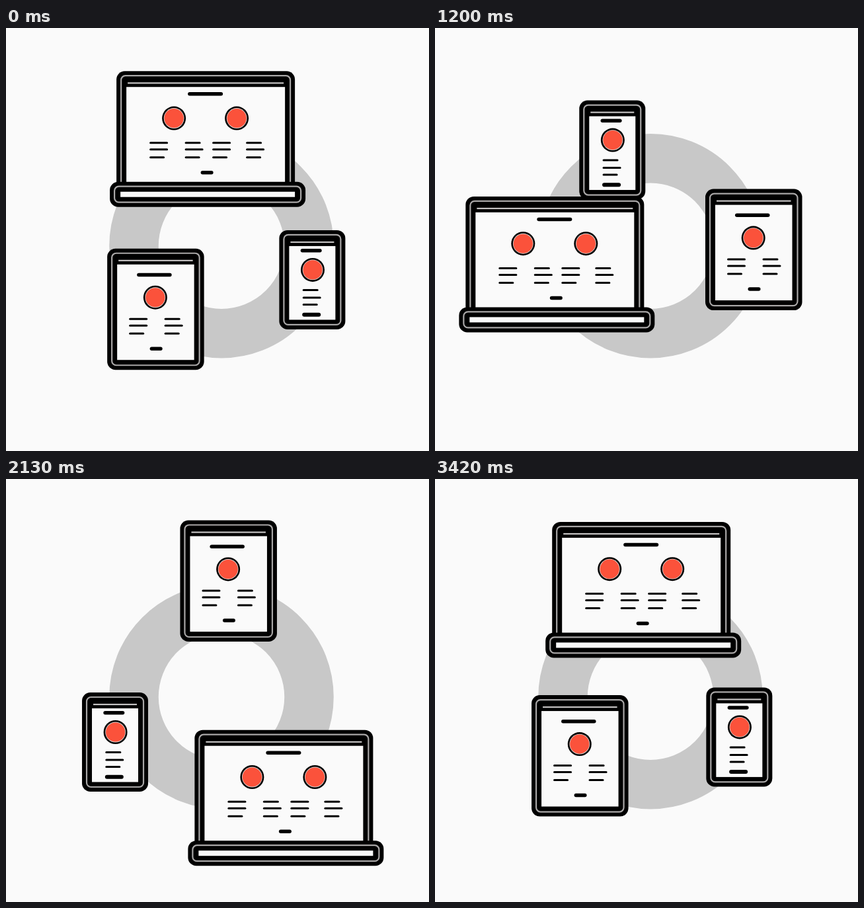
An HTML page that plays this animation: 640 px wide and 640 px high, repeating every 3450 ms.

```html
<!DOCTYPE html>
<html lang="en">
<head>
<meta charset="utf-8">
<title>Orbiting devices</title>
<style>
  html, body { margin: 0; width: 100%; height: 100%; overflow: hidden; background: #fafafa; }
  svg { display: block; width: 100vw; height: 100vh; }
</style>
</head>
<body>
<svg id="stage" viewBox="0 0 640 640">
  <circle cx="326" cy="329.7" r="132.5" fill="none" stroke="#c8c8c8" stroke-width="74.5"/>
</svg>
<script>
const LOOP = 3450, STEP = 30, RAD = Math.PI / 180;
const INK = '#000', EDGE = '#a9a7a7', PAPER = '#fafafa', RED = '#fb523b';
const stage = document.getElementById('stage');

function add(parent, tag, attrs) {
  const el = document.createElementNS('http://www.w3.org/2000/svg', tag);
  for (const key in attrs) el.setAttribute(key, attrs[key]);
  parent.appendChild(el);
  return el;
}

const box = (g, x, y, width, height, rx, fill) =>
  add(g, 'rect', { x, y, width, height, rx, fill });

function bar(g, x1, x2, y, w) {
  box(g, x1, y - w / 2, x2 - x1, w, w / 2, INK);
}

function dot(g, cx, cy) {
  [[18, INK], [15.4, '#d8d4d2'], [14.6, RED]].forEach(([r, fill]) =>
    add(g, 'circle', { cx, cy, r, fill }));
}

function text(g, x, ys, ends) {
  ys.forEach((y, i) => bar(g, x, x + ends[i], y, 3));
}

// Black case with a thin light outline inside its edge
function shell(g, x, y, w, h) {
  box(g, x, y, w, h, 12.5, INK);
  add(g, 'rect', {
    x: x + 7, y: y + 7, width: w - 14, height: h - 14, rx: 6.5,
    fill: 'none', stroke: EDGE, 'stroke-width': 2.2
  });
}

function screen(g, x, y, w, bottom) {
  box(g, x + 17, y + 17, w - 34, 2.2, 0, '#c4c2c2');
  box(g, x + 15, y + 24, w - 30, bottom - y - 24, 0, PAPER);
}

function laptop() {
  const g = add(stage, 'g', {}), ys = [174.5, 184.5, 196.5];
  shell(g, 167, 66, 270, 190);
  screen(g, 167, 66, 270, 236);
  shell(g, 157, 233.5, 296, 38);
  box(g, 173, 248.5, 264, 8, 0, PAPER);
  bar(g, 275, 328, 100.5, 5.5);
  dot(g, 254, 137.3);
  dot(g, 349, 137.3);
  text(g, 217, ys, [28, 28, 23]);
  text(g, 270.5, ys, [24, 28, 23]);
  text(g, 312, ys, [28, 28, 23]);
  text(g, 363, ys, [24, 28, 23]);
  bar(g, 294.5, 313.5, 219.5, 5.5);
  return g;
}

function tablet() {
  const g = add(stage, 'g', {}), ys = [440.5, 450.5, 462.5];
  shell(g, 153, 334, 146.5, 183.5);
  screen(g, 153, 334, 146.5, 502.5);
  bar(g, 198, 250.5, 373.7, 5.5);
  dot(g, 225.7, 408);
  text(g, 186, ys, [28, 28, 23]);
  text(g, 239.5, ys, [24, 28, 23]);
  bar(g, 217.5, 236.5, 485.5, 5.5);
  return g;
}

function phone() {
  const g = add(stage, 'g', {});
  shell(g, 413.7, 306, 100, 150);
  screen(g, 413.7, 306, 100, 441.5);
  bar(g, 446, 478, 336.7, 5.5);
  dot(g, 464.3, 366);
  text(g, 449, [396.5, 408, 418.5], [24, 28, 23]);
  bar(g, 448.5, 476.5, 433.7, 6);
  return g;
}

// Orbits: start angle, centre, radius, home position; lag delays the vertical part
const orbits = [
  { g: laptop(), a: -93.6, cx: 315.2, cy: 328, r: 160.6, hx: 305, hy: 168.5, lag: 28 },
  { g: tablet(), a: 131.5, cx: 329, cy: 309, r: 155.2, hx: 226, hy: 425.5, lag: 0 },
  { g: phone(), a: 16.1, cx: 311.5, cy: 337, r: 158.4, hx: 464, hy: 381, lag: 0 }
];

// [time in ms, degrees turned]
const turns = [[0, 0], [840, 84.3], [2520, 259.4], [2970, 309.6], [3420, 356.4], [LOOP, 360]];

function turned(t) {
  const i = turns.findIndex(k => k[0] > t);
  const [t0, d0] = turns[i - 1], [t1, d1] = turns[i];
  return d0 + (d1 - d0) * (t - t0) / (t1 - t0);
}

function draw(t) {
  const d = turned(t), swell = Math.sin(Math.PI * t / LOOP);
  for (const o of orbits) {
    const ax = (o.a - d) * RAD, ay = (o.a - d + o.lag * swell) * RAD;
    const x = o.cx + o.r * Math.cos(ax) - o.hx;
    const y = o.cy + o.r * Math.sin(ay) - o.hy;
    o.g.setAttribute('transform', `translate(${x.toFixed(2)} ${y.toFixed(2)})`);
  }
}

const start = performance.now();
function tick() {
  const t = (performance.now() - start) % LOOP;
  draw(Math.floor(t / STEP) * STEP);
  requestAnimationFrame(tick);
}
draw(0);
requestAnimationFrame(tick);
</script>
</body>
</html>
```
